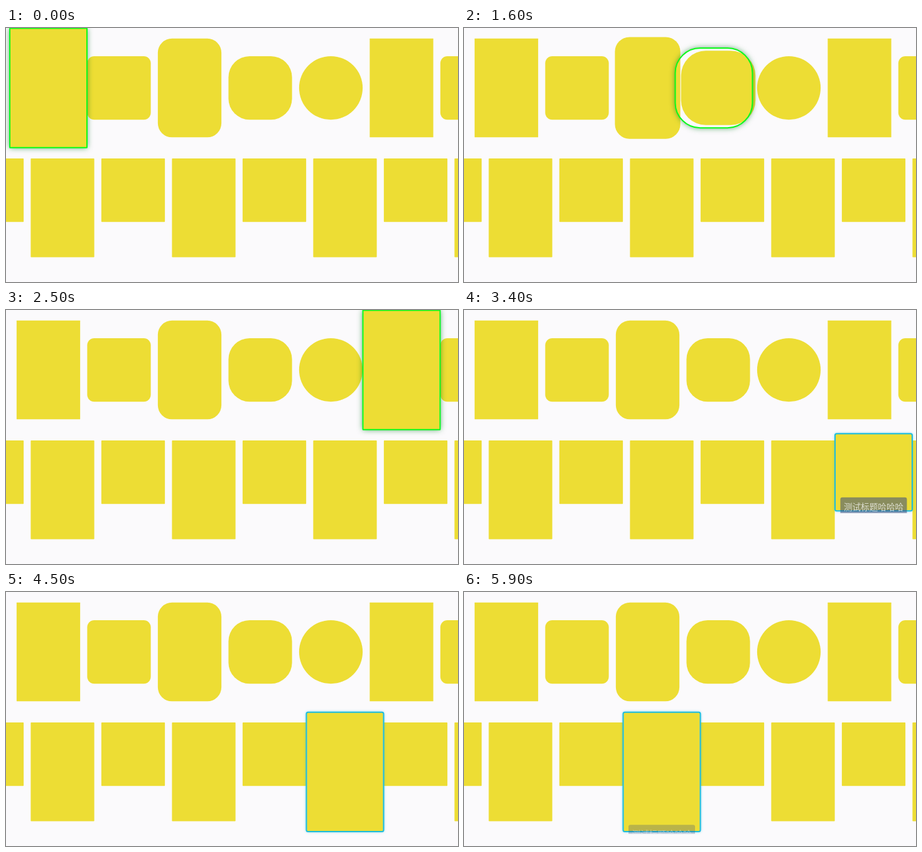
Recreate the animation shown at these times as an HTML page with a canvas. Size 720x405 px, loop 6 s.

```html
<!DOCTYPE html>
<html lang="zh">
<head>
<meta charset="utf-8">
<style>
  html, body { margin: 0; width: 100%; height: 100%; overflow: hidden; background: #fbfafc; }
  canvas { display: block; width: 720px; height: 405px; }
</style>
</head>
<body>
<canvas id="stage" width="720" height="405"></canvas>
<script>
const ctx = document.getElementById('stage').getContext('2d');
const LOOP = 6000, STEP = 100, MOVE = 300, TITLE_TIME = 300;
const SIZE = 101.25, TALL = 157.5, PITCH = 112.5, GROW = 0.2;
const TITLE = '测试标题哈哈哈';

const topRadii = [0.5, 11.25, 22.5, 33.75, SIZE / 2, 0.5, 11.25];
const topRow = topRadii.map((r, i) => ({
  x: 67.5 + i * PITCH, y: 95.6, w: SIZE, h: [0, 2, 5].includes(i) ? TALL : SIZE, r
}));
const bottomRow = Array.from({ length: 8 }, (_, i) => {
  const h = i % 2 ? TALL : SIZE;
  return { x: 90 + (i - 1) * PITCH, y: 208.1 + h / 2, w: SIZE, h, r: 0.8, titled: true };
});
const items = [...topRow, ...bottomRow];

// Each stop: the time the focus starts moving, and where it goes.
const stops = [
  [-MOVE, topRow[0]], [390, topRow[1]], [950, topRow[2]], [1375, topRow[3]],
  [1790, topRow[4]], [2200, topRow[5]], [2890, bottomRow[6]],
  [3780, bottomRow[5]], [4500, bottomRow[4]], [5490, bottomRow[3]]
].map(([start, item]) => ({ start, item }));

const clamp = v => Math.min(1, Math.max(0, v));
const lerp = (a, b, p) => a + (b - a) * p;
const decelerate = t => 1 - (1 - t) ** 2;
const smooth = t => (1 - Math.cos(Math.PI * t)) / 2;

function addBox({ x, y, w, h, r }) {
  ctx.roundRect(x - w / 2, y - h / 2, w, h, Math.min(r, w / 2, h / 2));
}

function drawItem(item, scale) {
  const { x, y, w, h, r } = item;
  ctx.fillStyle = '#eddd34';
  ctx.beginPath();
  addBox({ x, y, w: w * scale, h: h * scale, r: r * scale });
  ctx.fill();
}

function frameOf({ x, y, w, h, r, titled }) {
  const s = 1 + GROW;
  return { x, y, w: w * s + 1.4, h: h * s + 1.4, r: titled ? 2.5 : r * s };
}

function drawBorder(box, titled) {
  // The glow stays outside the outline.
  ctx.save();
  ctx.beginPath();
  ctx.rect(0, 0, 720, 405);
  addBox(box);
  ctx.clip('evenodd');
  ctx.shadowColor = titled ? 'rgba(20,180,220,.8)' : 'rgba(0,120,30,.7)';
  ctx.shadowBlur = titled ? 4 : 10;
  ctx.fillStyle = titled ? '#1cbcdc' : '#0f2';
  ctx.beginPath();
  addBox(box);
  ctx.fill();
  ctx.restore();

  ctx.strokeStyle = titled ? '#1cbcdc' : '#0bfb1b';
  ctx.lineWidth = 2;
  ctx.beginPath();
  addBox(box);
  ctx.stroke();
}

function drawTitle(box, p) {
  const bottom = box.y + box.h / 2 + 1;
  const top = bottom - 32 * p;
  ctx.save();
  ctx.beginPath();
  ctx.rect(box.x - box.w / 2, 0, box.w, bottom + 2.5);
  ctx.clip();
  ctx.globalAlpha = p;
  ctx.fillStyle = 'rgba(60,78,125,.8)';
  ctx.beginPath();
  ctx.roundRect(box.x - 53, top, 106, 30, 3);
  ctx.fill();
  ctx.fillStyle = '#fff';
  ctx.font = '13.6px "Noto Sans CJK SC", "Noto Sans CJK", sans-serif';
  ctx.textAlign = 'center';
  ctx.textBaseline = 'middle';
  ctx.fillText(TITLE, box.x, top + 15);
  ctx.restore();
}

function draw(time) {
  const index = stops.findLastIndex(s => s.start <= time);
  const { start, item } = stops[index];
  const previous = index ? stops[index - 1].item : null;
  const t = clamp((time - start) / MOVE);
  const grown = GROW * smooth(t);

  ctx.fillStyle = '#fbfafc';
  ctx.fillRect(0, 0, 720, 405);
  for (const it of items) if (it !== item && it !== previous) drawItem(it, 1);
  if (previous) drawItem(previous, 1 + GROW - grown);
  drawItem(item, 1 + grown);

  const to = frameOf(item), from = previous ? frameOf(previous) : to;
  const p = decelerate(t), box = {};
  for (const key in to) box[key] = lerp(from[key], to[key], p);
  drawBorder(box, item.titled);

  const shown = clamp((time - start - MOVE) / TITLE_TIME);
  if (item.titled && shown > 0) drawTitle(box, shown);
}

function tick() {
  const time = performance.now() % LOOP;
  draw(Math.floor(time / STEP) * STEP);
  requestAnimationFrame(tick);
}
tick();
</script>
</body>
</html>
```
